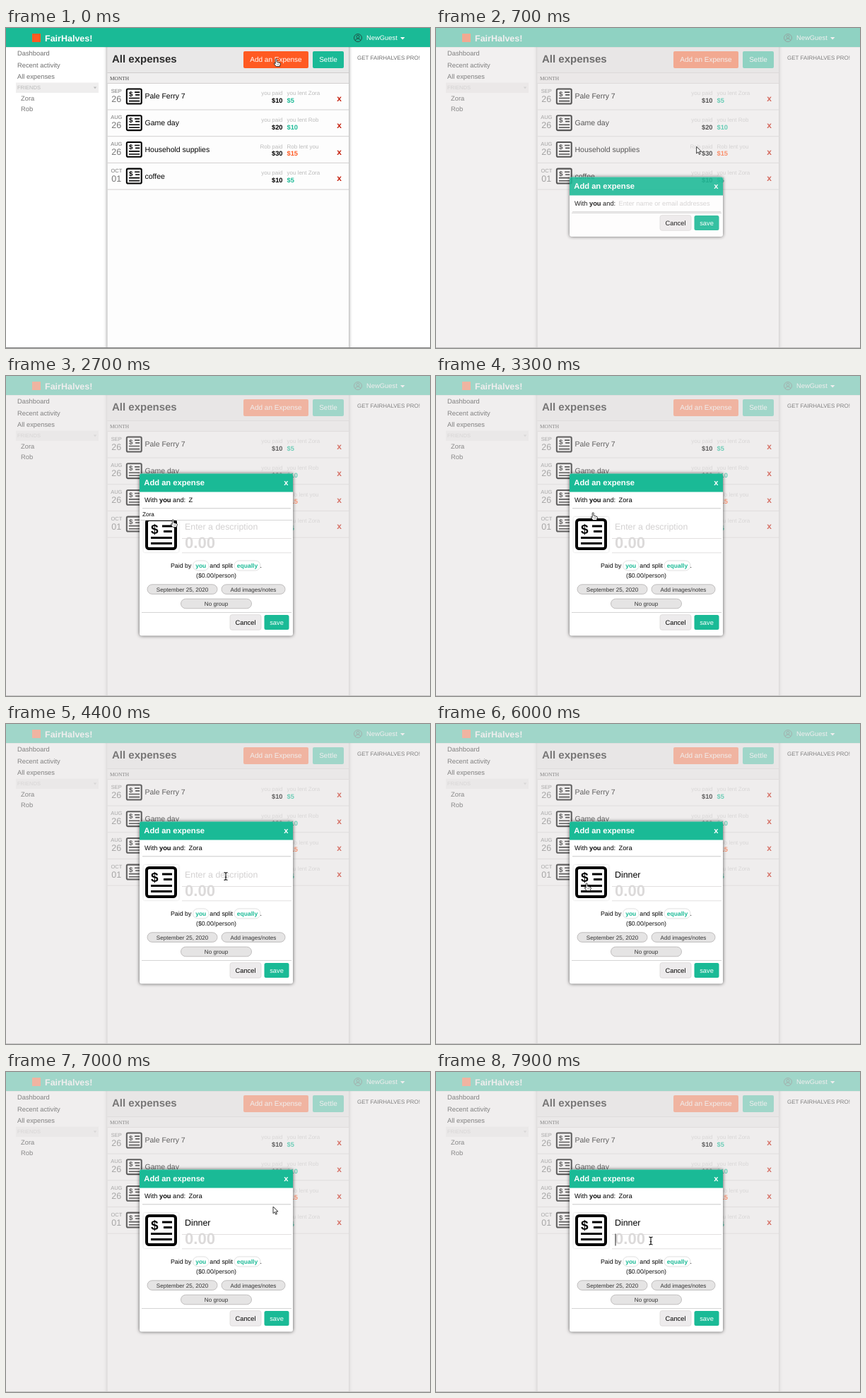
Animation of 600x454 px, one loop 8000 ms. Source, as an HTML page:

```html
<!DOCTYPE html>
<html lang="en">
<head>
<meta charset="utf-8">
<title>Shared expenses</title>
<style>
html, body { margin: 0; width: 100%; height: 100%; overflow: hidden; background: #fff; }
svg { display: block; width: 600px; height: 454px; }
text { font-family: "Liberation Sans", Arial, sans-serif; text-rendering: geometricPrecision; white-space: pre; }
.b { font-weight: bold; }
.e { text-anchor: end; }
.m { text-anchor: middle; }
.s { font-family: "Liberation Serif", serif; }
.card { filter: drop-shadow(0 0 2.5px rgba(0, 0, 0, .65)); }
</style>
</head>
<body>
<svg id="stage" viewBox="0 0 600 454" xmlns="http://www.w3.org/2000/svg"></svg>
<script>
const TEAL = '#1aba96', ORANGE = '#ff5a22', LOOP = 8000, STEP = 100;
const FRIEND = 'Zora', OTHER = 'Rob', DISH = 'Dinner';

// Markup helpers
const text = (x, y, size, str, fill = '#000', cls = '', id = '') =>
  `<text x="${x}" y="${y}" font-size="${size}" fill="${fill}" class="${cls}" id="${id}">${str}</text>`;
const box = (x, y, w, h, fill, r = 0, more = '') =>
  `<rect x="${x}" y="${y}" width="${w}" height="${h}" rx="${r}" fill="${fill}" ${more}/>`;
const rule = (x, y, w, fill = '#d2d0d0') => box(x, y, w, 1, fill);
const group = (id, body, more = '') => `<g id="${id}" ${more}>${body}</g>`;
const pill = (x, y, w, h, str) =>
  box(x, y, w, h, '#e5e4e4', h / 2, 'stroke="#b4b2b2" stroke-width=".8"') +
  text(x + w / 2, y + 9.8, 8.1, str, '#333', 'm');
const chip = (x, w, str) =>
  box(x, 262, w, 14, '#fff', 7, 'stroke="#d8d8d8" stroke-width=".8"') +
  text(x + w / 2, 272, 8.5, str, TEAL, 'b m');
const caret = (id, h) => box(0, 0, 1, h, '#222', 0, `id="${id}"`);

const bill = (x, y, k) => `<g transform="translate(${x} ${y}) scale(${k})">
  <rect x="2" y="2" width="41" height="41" rx="3.5" fill="none" stroke="#000" stroke-width="4"/>
  ${text(8, 22, 19, '$', '#000', 'b')}
  <path d="M24 11H38M26 18.5H38M8 27.5H38M8 35.5H38" stroke="#000" stroke-width="3.2" fill="none"/></g>`;

const rows = [
  ['SEP', '26', 'Pale Ferry 7', 'you', `you lent ${FRIEND}`, 10, 5, TEAL],
  ['AUG', '26', 'Game day', 'you', `you lent ${OTHER}`, 20, 10, TEAL],
  ['AUG', '26', 'Household supplies', OTHER, `${OTHER} lent you`, 30, 15, ORANGE],
  ['OCT', '01', 'coffee', 'you', `you lent ${FRIEND}`, 10, 5, TEAL]
];
const rowY = i => i * 37.7;

function page() {
  let s = box(0, 0, 600, 454, '#fff') +
    box(143.5, 20, 341.5, 440, '#fdfdfd', 0, 'style="filter:drop-shadow(0 0 2.5px rgba(0,0,0,.5))"') +
    box(143.5, 27, 341.5, 36.5, '#e9e8e8') + rule(143.5, 63, 341.5, '#cfcdcd') +
    box(143.5, 64, 341.5, 14, '#efeeee') + rule(143.5, 78, 341.5) +
    box(0, 0, 600, 27, TEAL) + box(0, 27, 600, 1, '#000', 0, 'opacity=".08"') +
    box(37, 8, 12, 12, ORANGE) +
    text(55, 19, 12.5, 'FairHalves!', '#fff', 'b') +
    text(510, 17, 9.4, 'NewGuest', '#fff') +
    '<path d="M558 13h6.4l-3.2 3.4z" fill="#fff"/>' +
    '<g fill="none" stroke="#20453d" stroke-width=".9"><circle cx="498" cy="14" r="5.5"/><circle cx="498" cy="12.4" r="2"/><path d="M494.3 17.8q.5-2.8 3.7-2.8t3.7 2.8"/></g>' +
    box(336, 33, 92, 24, ORANGE, 2) + text(382, 48.4, 10, 'Add an Expense', '#fff', 'm') +
    box(434, 33, 44, 24, TEAL, 2) + text(456, 48.4, 10, 'Settle', '#fff', 'm') +
    box(14, 77.5, 117, 14.5, '#efeeee') + text(16, 87.3, 7.5, 'FRIENDS', '#b9b9b9') +
    '<path d="M123.8 83.6h4.4l-2.2 2.6z" fill="#bbb"/>';
  rows.forEach(([, , , payer, lent], i) => {
    const y = rowY(i);
    s += rule(143.5, 115.5 + y, 341.5) +
      text(391.5, 95.3 + y, 8, `${payer} paid`, '#bcbcbc', 'e') +
      text(397.5, 95.3 + y, 8, lent, '#bcbcbc');
  });
  return s + rule(0, 453, 600, '#8b8b8b');
}

function ink() {
  let s = text(150, 49, 15, 'All expenses', '#2c2c2c', 'b') +
    text(147, 74, 7.4, 'MONTH', '#444', 's');
  rows.forEach(([month, day, name, , , paid, share, hue], i) => {
    const y = rowY(i);
    s += text(156.3, 91.5 + y, 7.5, month, '#777', 'm') +
      text(156.3, 104.5 + y, 12.5, day, '#777', 'm') +
      bill(169.8, 85.5 + y, .51) + text(196.5, 100.4 + y, 10.5, name) +
      text(391.5, 106 + y, 9.3, '$' + paid, '#000', 'b e') +
      text(397.5, 106 + y, 9.3, '$' + share, hue, 'b') +
      text(468.3, 104.2 + y, 12, 'x', '#c5210f', 'b');
  });
  return s;
}

function side() {
  return text(16, 39, 9.35, 'Dashboard', '#6f6f6f') + text(16, 55.6, 9.35, 'Recent activity', '#6f6f6f') +
    text(16, 72.4, 9.35, 'All expenses', '#6f6f6f') + text(21, 103, 9.35, FRIEND, '#777') +
    text(21, 117.8, 9.35, OTHER, '#777') + text(497, 44.8, 8, 'GET FAIRHALVES PRO!', '#6f6f6f');
}

const banner = (x, title) =>
  `<path d="M${x} 164.5V141.5q0-3 3-3h211q3 0 3 3v23z" fill="${TEAL}"/>` +
  text(x + 6.3, 155.3, 11.2, title, '#fff', 'b') + text(x + 204.2, 155.3, 11.2, 'x', '#fff', 'b');

function form() {
  const head = banner(189, 'Add an expense') +
    text(196, 179, 9.25, 'With <tspan font-weight="bold">you</tspan> and:') +
    text(258.5, 179, 9.3, '', '#000', '', 'who') + rule(193, 187.3, 210, '#c9c9c9') + caret('whoCaret', 11);
  const body = box(194.5, 200, 50, 50, '#fff', 2, 'style="filter:drop-shadow(0 0 1px rgba(0,0,0,.18))"') +
    bill(197, 202, 1) + text(253, 217.5, 12.4, '', '#000', '', 'what') + rule(249, 230, 155, '#e2e0e0') +
    text(253, 244.3, 22.1, '0.00', '#dcdada', 'b') + rule(249, 250.3, 155, '#e2e0e0') +
    caret('whatCaret', 14) + caret('sumCaret', 17) +
    text(233, 272, 8.8, 'Paid by') + chip(264.5, 22.5, 'you') + text(288.3, 272, 8.8, 'and split') +
    chip(323, 37, 'equally') + text(359.5, 272, 8.8, '.') +
    text(297.5, 286, 8.75, '($0.00/person)', '#111', 'm') +
    pill(200, 295.8, 99, 13.6, 'September 25, 2020') + pill(305, 295.8, 90, 13.6, 'Add images/notes') +
    pill(247.5, 316.2, 100, 13.6, 'No group') +
    group('hint', box(190, 189, 215, 15.5, '#fff') + text(193, 199.2, 8.2, FRIEND) + rule(190, 204, 215, '#d5d5d5'));
  const foot = rule(192, 335, 212, '#d5d5d5') +
    box(317, 338.7, 44, 21.6, '#edebec', 3, 'stroke="#dbd8d9" stroke-width=".8"') +
    text(339, 353, 9.3, 'Cancel', '#000', 'm') +
    box(365.5, 339, 35, 21, TEAL, 2.5) + text(383, 353, 9.3, 'save', '#fff', 'm');
  return box(189, 138.5, 217, 230, '#fff', 3, 'id="frame" class="card"') +
    group('head', head) + group('body', body) + group('foot', foot);
}

function picker() {
  const kinds = ['Entertainment', 'Food and drink', 'Home', 'Life', 'Transportation', 'Uncategorized', 'Utilities'];
  const foods = ['Dining out', 'Groceries', 'Liquor', 'Other'];
  return box(301, 138.5, 217, 230, '#fff', 3, 'class="card"') + banner(301, 'Choose a category') +
    box(301, 192, 108, 28, '#c6c5c5', 0, 'id="hover"') +
    kinds.map((k, i) => text(307.3, 181 + i * 27.85, 8.7, k)).join('') +
    box(409, 164.5, 1, 196, '#a9c4be') + box(412, 164.5, 105.5, 199.5, '#e8e6e6') +
    group('foods', foods.map((f, i) => box(412, 164.5 + i * 22.8, 105.5, 22.8, '#d2d0d0') +
      rule(412, 186.5 + i * 22.8, 105.5, '#b9b7b7') + text(418, 178.6 + i * 22.9, 8.7, f, '#000', 'b')).join(''));
}

const solid = d => `<path d="${d}" fill="#fff" stroke="#222" stroke-width=".9" stroke-linejoin="round"/>`;
const pointers = {
  hand: solid('M-2.8-4.6q1-1.4 2 0V-.8l3.8 1q1.6.4 1.4 2L3.6 4v1.6H-1.8l-3-4q0-1.8 2 0z') +
    '<path d="M-.2 1.4v2.2M1.6 1.4v2.2" stroke="#222" stroke-width=".5"/>',
  arrow: solid('M-3-5V4.6l2.3-2 1.5 3.5 1.6-.7-1.5-3.4H4z'),
  beam: ['#fff', '#111'].map((c, i) => `<path d="M-2.5-5.4Q0-5.4 0-3.9Q0-5.4 2.5-5.4M0-3.9V3.9M-2.5 5.4Q0 5.4 0 3.9Q0 5.4 2.5 5.4M-1.3 1.2H1.3" fill="none" stroke="${c}" stroke-width="${i ? 1.1 : 2.2}"/>`).join('')
};

const $ = id => document.getElementById(id);
$('stage').innerHTML = page() + box(0, 0, 600, 454, '#e8e5e5', 0, 'id="veil"') +
  group('ink', ink()) + group('side', side()) + group('form', form()) + group('picker', picker()) +
  Object.entries(pointers).map(([k, v]) => group(k, v)).join('');

// time, x, y, pointer
const path = [
  [0, 384, 49, 'hand'], [200, 384, 52, 'hand'], [300, 383, 64, 'arrow'], [900, 366, 228, 'arrow'],
  [1300, 356, 239, 'beam'], [1600, 343, 249, 'beam'], [2400, 343, 249, 'beam'], [2500, 310, 236, 'arrow'],
  [2700, 238, 209, 'hand'], [3000, 224, 199, 'hand'], [3400, 224, 199, 'arrow'],
  [3700, 285, 212, 'beam'], [3900, 311, 216, 'beam'], [5500, 311, 216, 'beam'],
  [5700, 258, 224, 'arrow'], [5900, 215, 231, 'hand'], [6100, 215, 231, 'hand'],
  [6200, 250, 228, 'arrow'], [6300, 250, 228, 'arrow'], [6400, 306, 222, 'hand'],
  [6500, 348, 217, 'hand'], [6600, 384, 202, 'hand'], [6800, 438, 178, 'hand'],
  [6900, 430, 181, 'arrow'], [7100, 332, 211, 'beam'], [7300, 332, 211, 'beam'], [7500, 304, 239.5, 'beam']
];
const typed = [4500, 4800, 4900, 5100, 5200, 5300];

const show = (id, on) => { $(id).style.display = on ? '' : 'none'; };
const move = (id, x, y) => $(id).setAttribute('transform', `translate(${x} ${y})`);
const during = (t, a, b) => t >= a && t < b;

function field(id, value, hint) {
  $(id).textContent = value || hint;
  $(id).setAttribute('fill', value ? '#000' : '#d3d1d1');
}

function drawPointer(t) {
  const i = path.findLastIndex(k => k[0] <= t);
  const [t0, x0, y0, kind] = path[i], [t1, x1, y1] = path[i + 1] || [LOOP, x0, y0];
  const p = (t - t0) / (t1 - t0);
  for (const k in pointers) show(k, k === kind);
  move(kind, x0 + (x1 - x0) * p, y0 + (y1 - y0) * p);
}

function draw(t) {
  const p = Math.min(1, t / 900), fade = p * p * (3 - 2 * p);
  $('veil').style.opacity = .65 * fade;
  $('ink').style.opacity = 1 - .4 * fade;
  $('side').style.opacity = 1 - .15 * fade;
  $('form').style.opacity = fade;

  const open = t >= 2200, picking = during(t, 6100, 6900);
  move('form', picking ? -112 : 0, 0);
  $('frame').setAttribute('y', open ? 138.5 : 211.5);
  $('frame').setAttribute('height', open ? 230 : 84.5);
  move('head', 0, open ? 0 : 73);
  move('foot', 0, open ? 0 : -73);
  show('body', open);
  show('hint', during(t, 2300, 3300));
  show('picker', picking);
  show('hover', during(t, 6400, 6700));
  show('foods', t >= 6400);

  const n = typed.filter(k => k <= t).length;
  field('who', t >= 3300 ? FRIEND : open ? FRIEND[0] : '', 'Enter name or email addresses');
  field('what', DISH.slice(0, n), 'Enter a description');

  show('whoCaret', during(t, 1600, 2100) || during(t, 2200, 2600));
  move('whoCaret', open ? 265 : 258, 170);
  show('whatCaret', during(t, 3900, 4400) || during(t, 4500, 5800));
  move('whatCaret', 253 + (n ? $('what').getComputedTextLength() : 0), 206);
  show('sumCaret', t >= 7700);
  move('sumCaret', 253.5, 229.5);
  drawPointer(t);
}

function tick() {
  draw(Math.floor(performance.now() % LOOP / STEP) * STEP);
  requestAnimationFrame(tick);
}
tick();
</script>
</body>
</html>
```
